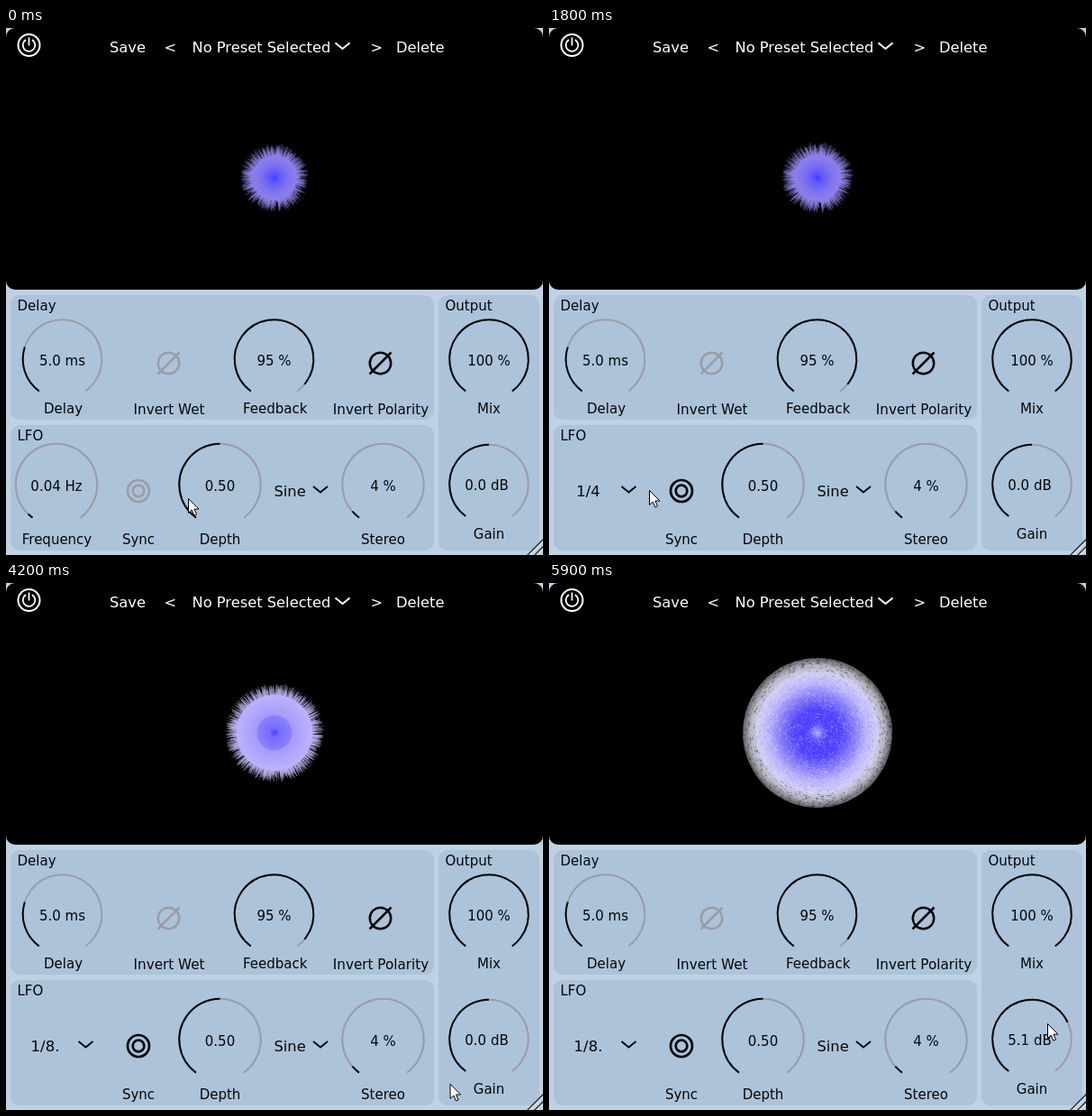
These frames come from a looping animation (596 by 584 pixels, 6000 ms). An HTML page with a canvas:

```html
<!DOCTYPE html>
<html lang="en">
<head>
<meta charset="utf-8">
<title>Flanger panel</title>
<style>
html, body { margin: 0; width: 596px; height: 584px; overflow: hidden; background: #bed2e4; }
canvas { display: block; }
</style>
</head>
<body>
<canvas id="stage" width="596" height="584"></canvas>
<script>
const ctx = document.getElementById('stage').getContext('2d');
const TAU = Math.PI * 2;
const LOOP = 6000, STEP = 100;
const GREY = '#9b9ca9', BLACK = '#050608', PANEL = '#adc3da', BACK = '#bed2e4';
const SANS = '"DejaVu Sans", sans-serif';

// Keys are [time, value, ...]
const CURSOR = [
  [0, 202, 521], [600, 141, 513], [1400, 141, 513], [1800, 111, 512], [2100, 87, 517],
  [2700, 87, 517], [3100, 84, 590], [3500, 84, 590], [3600, 88, 566], [4300, 560, 553],
  [4600, 536, 480], [4900, 534, 475], [5900, 553, 488]
];
const GAIN = [[0, 0], [4700, 0], [4900, -0.7], [5900, 5.1]];

function sample(keys, t, column = 1) {
  const i = keys.findIndex(k => k[0] > t);
  if (i < 0) return keys[keys.length - 1][column];
  const a = keys[i - 1], b = keys[i];
  return a[column] + (b[column] - a[column]) * (t - a[0]) / (b[0] - a[0]);
}

function random(seed) {
  return () => (seed = (seed * 16807) % 2147483647) / 2147483647;
}

function text(str, x, y, { size = 15, color = BLACK, align = 'center', family = SANS } = {}) {
  ctx.font = size + 'px ' + family;
  ctx.textAlign = align;
  ctx.fillStyle = color;
  ctx.fillText(str, x, y);
}

function box(x, y, w, h, r, color) {
  ctx.fillStyle = color;
  ctx.beginPath();
  ctx.roundRect(x, y, w, h, r);
  ctx.fill();
}

function arc(x, y, r, from, to, color, width) {
  ctx.strokeStyle = color;
  ctx.lineWidth = width;
  ctx.beginPath();
  ctx.arc(x, y, r, from, to);
  ctx.stroke();
}

function polyline(points, color, width) {
  ctx.strokeStyle = color;
  ctx.lineWidth = width;
  ctx.beginPath();
  points.forEach(([x, y]) => ctx.lineTo(x, y));
  ctx.stroke();
}

function knob(x, y, r, value, label) {
  const start = 0.7 * Math.PI, sweep = 1.6 * Math.PI;
  arc(x, y, r, start, start + sweep, GREY, 2);
  arc(x, y, r, start, start + sweep * value, BLACK, 2);
  text(label, x, y + 7);
}

function chevron(x, y, color) {
  polyline([[x - 8, y - 3.5], [x, y + 3], [x + 8, y - 3.5]], color, 2);
}

function phaseIcon(x, y, color) {
  arc(x, y, 11.7, 0, TAU, color, 2.5);
  polyline([[x - 12, y + 12], [x + 12, y - 12]], color, 2.5);
}

function syncIcon(x, y, color) {
  arc(x, y, 12, 0, TAU, color, 2.7);
  arc(x, y, 6.3, 0, TAU, color, 2.7);
}

function orbRadius(t) {
  const beat = Math.floor((t - 300) / 800);
  const phase = t - 300 - beat * 800;
  const rest = beat < 0 ? 36 : beat === 0 ? 42.5 : beat < 4 ? 39 : beat < 6 ? 54 : 45;
  const peak = beat === 5 ? 80 : 83;
  return rest + (peak - rest) * Math.exp(-phase / 150);
}

const SMALL = [[0, '#4238ff'], [.12, '#5f55fa'], [.4, '#7e73f0'], [.7, '#8f83e6'], [.85, '#7a70c4'], [1, '#4a4480']];
const MEDIUM = [[0, '#4a42fa'], [.1, '#766cff'], [.34, '#8a80fc'], [.37, '#a59bfc'], [.75, '#bbb2fb'], [.88, '#b4aee0'], [1, '#6c6884']];
const LARGE = [[0, '#aaa4ff'], [.07, '#7066fc'], [.14, '#4c3eff'], [.32, '#5244fa'], [.5, '#877ef8'], [.66, '#bdb7fa'], [.8, '#d2cff2'], [.9, '#b4b4bc'], [1, '#5c5c62']];

function radial(x, y, r, stops) {
  const fill = ctx.createRadialGradient(x, y, 0, x, y, r);
  stops.forEach(([at, color]) => fill.addColorStop(at, color));
  return fill;
}

function spikes(x, y, r, shortest, stops) {
  const rnd = random(731);
  ctx.fillStyle = ctx.strokeStyle = radial(x, y, r, stops);
  ctx.lineWidth = .5;
  ctx.beginPath();
  ctx.arc(x, y, r * shortest, 0, TAU);
  ctx.fill();
  ctx.beginPath();
  for (let i = 0; i < r * 22; i++) {
    const a = rnd() * TAU, d = r * (shortest + (1.02 - shortest) * rnd());
    ctx.moveTo(x, y);
    ctx.lineTo(x + d * Math.cos(a), y + d * Math.sin(a));
  }
  ctx.stroke();
}

function grain(x, y, r) {
  const rnd = random(97);
  ctx.fillStyle = radial(x, y, r, LARGE);
  ctx.beginPath();
  ctx.arc(x, y, r, 0, TAU);
  ctx.fill();
  for (let i = 0; i < 8; i++) {
    const a = i * TAU / 8;
    arc(x + r * .32 * Math.cos(a), y + r * .32 * Math.sin(a), r * .32, 0, TAU, 'rgba(215,210,255,.18)', .8);
  }
  for (let i = 0; i < 3600; i++) {
    const d = Math.sqrt(rnd()), a = rnd() * TAU, span = (.8 + 2.4 * rnd()) / (r * d + 1);
    const dark = rnd() < (d - .76) * 2.6;
    const color = dark ? 'rgba(0,0,0,.5)' : rnd() < .5 ? 'rgba(255,255,255,.3)' : 'rgba(60,40,255,.16)';
    arc(x, y, d * r, a, a + span, color, .8);
  }
}

function orb(r) {
  if (r > 72) grain(298, 166, r);
  else if (r > 42) spikes(298, 166, r, .78, MEDIUM);
  else spikes(298, 166, r, .66, SMALL);
}

function header() {
  box(0, 0, 596, 290, 10, '#000');
  const white = { size: 16.3, color: '#fff', align: 'left' };
  text('Save', 115, 27, white);
  text('<', 175.5, 27, white);
  text('No Preset Selected', 206.5, 27, white);
  text('>', 404.5, 27, white);
  text('Delete', 433, 27, white);
  chevron(373.5, 20, '#fff');
  arc(25.5, 19, 12, 0, TAU, '#fff', 2);
  arc(25.5, 19, 6.8, -1.05, Math.PI + 1.05, '#fff', 1.8);
  polyline([[25.5, 10.5], [25.5, 19.5]], '#fff', 1.8);
}

function panels() {
  box(5, 296, 470, 138, 10, PANEL);
  box(5, 440, 470, 139, 10, PANEL);
  box(480, 296, 112, 283, 10, PANEL);
  text('Delay', 12.5, 313, { align: 'left' });
  text('LFO', 12.5, 457, { align: 'left' });
  text('Output', 487.5, 313, { align: 'left' });
}

function controls(t) {
  const synced = t >= 1100;
  const gain = sample(GAIN, t);

  knob(62.5, 367, 43.8, .25, '5.0 ms');
  knob(297.5, 367, 43.8, .95, '95 %');
  knob(536, 367, 43.8, 1, '100 %');
  phaseIcon(180.5, 371.5, GREY);
  phaseIcon(415.5, 371.5, BLACK);
  text('Delay', 63.5, 427);
  text('Invert Wet', 181, 428, { size: 15.2 });
  text('Feedback', 298.7, 427);
  text('Invert Polarity', 416, 428, { size: 15.2 });
  text('Mix', 536, 427);

  if (synced) {
    text(t < 3300 ? '1/4' : '1/8.', 43.5, 519, { size: 16.5 });
    chevron(88.5, 511.5, BLACK);
  } else {
    knob(56, 506, 45.2, .028, '0.04 Hz');
    text('Frequency', 56.5, 572);
  }
  syncIcon(147, 513, synced ? BLACK : GREY);
  knob(237.5, 506, 45.2, .5, '0.50');
  text('Sine', 297.5, 519, { size: 16.3, align: 'left' });
  chevron(349, 511.5, BLACK);
  knob(418.5, 506, 45.2, .045, '4 %');
  knob(536, 505.5, 43.8, .5 + gain * .044, '');
  text(gain.toFixed(1) + ' dB', 533.5, 512);
  text('Sync', 147, 572);
  text('Depth', 237.5, 572);
  text('Stereo', 418.5, 572);
  text('Gain', 536, 566);
}

function grip() {
  for (const d of [0, 8]) {
    polyline([[578 + d, 585], [597, 566 + d]], '#30343a', 1.6);
    polyline([[580 + d, 585], [597, 568 + d]], '#e6edf4', 1.2);
  }
}

function menu() {
  ctx.save();
  ctx.shadowColor = 'rgba(0,0,0,.55)';
  ctx.shadowBlur = 9;
  ctx.fillStyle = '#000';
  ctx.fillRect(5, 533, 138, 60);
  ctx.restore();
  text('1/1', 18, 560, { size: 13, color: '#fff', align: 'left', family: '"Liberation Sans", sans-serif' });
}

function pointer(x, y) {
  const outline = [[0, 0], [0, 16], [3.7, 12.6], [6.4, 18.6], [9, 17.4], [6.4, 11.6], [11.5, 11.6]];
  ctx.beginPath();
  outline.forEach(([dx, dy]) => ctx.lineTo(x + dx + .5, y + dy + .5));
  ctx.closePath();
  ctx.fillStyle = '#fff';
  ctx.fill();
  ctx.strokeStyle = '#000';
  ctx.lineWidth = 1;
  ctx.stroke();
}

function draw(t) {
  ctx.fillStyle = BACK;
  ctx.fillRect(0, 0, 596, 584);
  header();
  orb(orbRadius(t));
  panels();
  controls(t);
  grip();
  if (t >= 2400 && t < 3300) menu();
  pointer(sample(CURSOR, t, 1), sample(CURSOR, t, 2));
}

let shown = -1;
function tick() {
  const t = Math.floor(performance.now() % LOOP / STEP) * STEP;
  if (t !== shown) draw(shown = t);
  requestAnimationFrame(tick);
}
tick();
</script>
</body>
</html>
```
